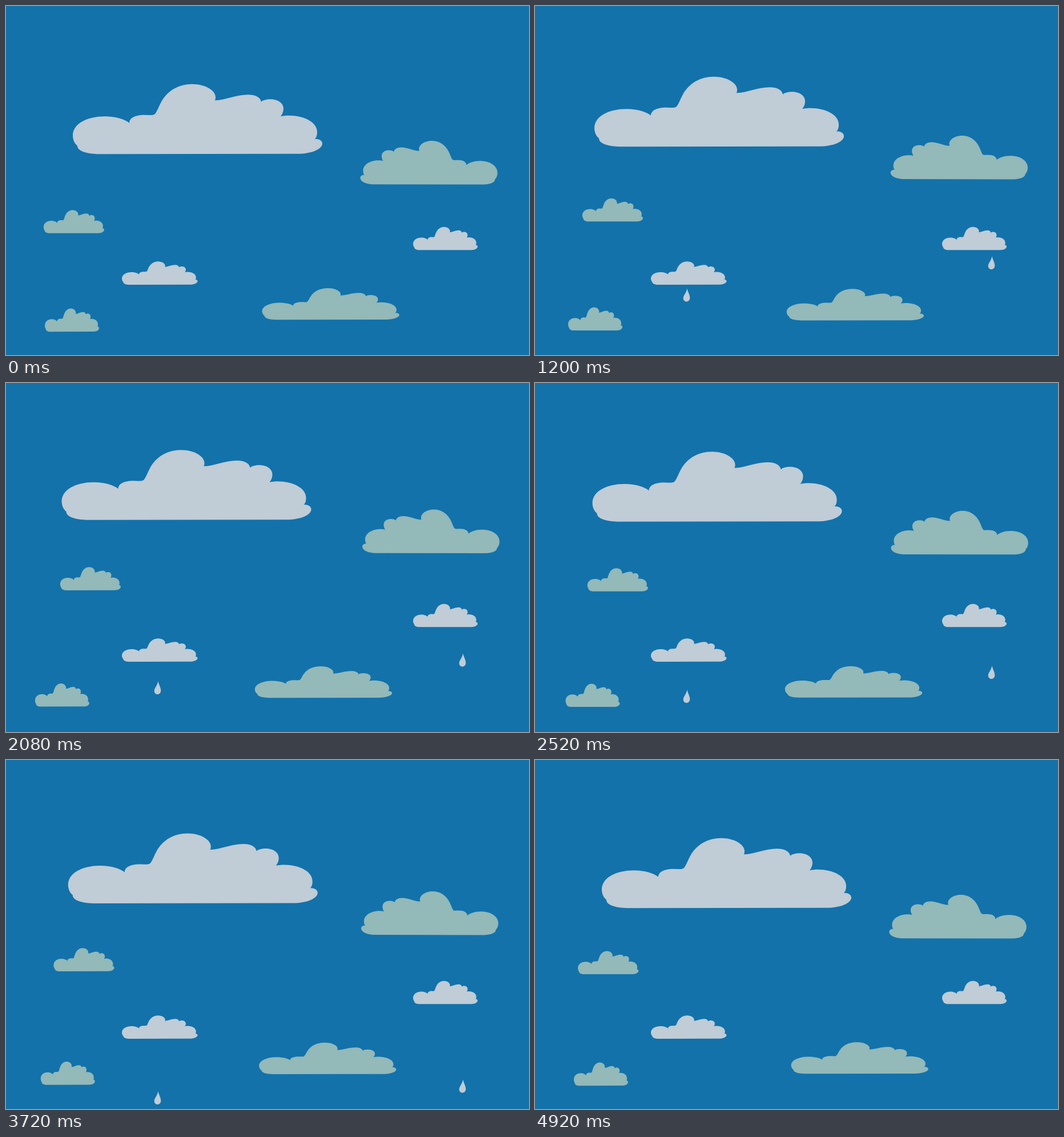
These frames come from a looping animation (916x611 px, 4.96 s). An HTML page with a canvas:

```html
<!DOCTYPE html>
<html lang="en">
<head>
<meta charset="utf-8">
<title>Clouds</title>
<style>
html, body { margin: 0; width: 100%; height: 100%; overflow: hidden; background: #1372aa; }
canvas { display: block; }
</style>
</head>
<body>
<canvas id="stage" width="916" height="611"></canvas>
<script>
const ctx = document.getElementById('stage').getContext('2d');
const LOOP = 4960, STEP = 40, END = 4920;
const SKY = '#1372aa', PALE = '#c0ccd6', GREEN = '#93b9b9';
const CLOUD_W = 437, CLOUD_H = 122.5;

const cloudShape = new Path2D(
  'M44 122.5C24 122 8 117 8 108C3 104 0 97 0 90C0 70 24 56.5 56 56.5' +
  'C76 56.5 92 62 99 68C99 59 110 54 125 54C133 54 140 55 143 53' +
  'C147 50 150 40 155 31C166 11 186 0 209 0C232 0 250 11 250 23' +
  'C250 25 249.5 27 249 28.5C268 28 286 18.5 307 18.5C319 18.5 329 23 330 31' +
  'C333 28 339 26.5 346 26.5C359 26.5 369 33 369 43C369 48 367 53 364 56.5' +
  'C369 55.5 373 55 378 55C406 55 428 67 428 84C428 89 427 93 424 96' +
  'C431 95 437 99 437 104C437 114 418 122 394 122Z');

const dropShape = new Path2D(
  'M0 0C1 6 4.8 11 4.8 16.5C4.8 20.5 2 23 -1.2 23' +
  'C-4.5 23 -6.8 20.5 -6.8 17C-6.8 12 -2 9 0 0Z');

// Each drifting cloud heads for `far` until `turn`, then on to `last`.
const clouds = [
  { x: 117, y: 136.8, w: 437, h: 122.5, color: PALE, turn: 1910, far: [-20.6, -20.8] },
  { x: 620.5, y: 236, w: 240.3, h: 76.5, color: GREEN, flip: true, turn: 1980, far: [3.7, -15] },
  { x: 65.8, y: 357.2, w: 106.2, h: 40.6, color: GREEN, turn: 2050, far: [29.2, -35], last: [9.3, -22.7] },
  { x: 713, y: 386.7, w: 113, h: 40.6, color: PALE },
  { x: 203, y: 447.2, w: 132.5, h: 40.8, color: PALE },
  { x: 448.6, y: 494, w: 240.3, h: 55.2, color: GREEN, turn: 2000, far: [-13.1, 2] },
  { x: 68, y: 529.6, w: 95, h: 40.6, color: GREEN, turn: 2070, far: [-17.2, -3.7] }
];

const dropTimes = [0, 760, 1680, 2520, 3000, 3720, 4960];
const drops = [
  { x: 266.5, tips: [461.5, 482, 509, 537, 554, 580, 625] },
  { x: 800.5, tips: [403, 424, 455.5, 495, 520, 559.5, 626] }
];

function drift({ turn, far, last = [0, 0] }, t) {
  if (!far) return [0, 0];
  if (t < turn) return far.map(d => d * t / turn);
  const p = Math.min(1, (t - turn) / (END - turn));
  return far.map((d, i) => d + (last[i] - d) * p);
}

// Smooth curve through unevenly spaced keys.
function curve(times, values, t) {
  const n = times.length - 1;
  let i = 0;
  while (i < n - 1 && t >= times[i + 1]) i++;
  const slope = k => {
    const a = Math.max(0, k - 1), b = Math.min(n, k + 1);
    return (values[b] - values[a]) / (times[b] - times[a]);
  };
  const span = times[i + 1] - times[i];
  const p = (t - times[i]) / span, q = 1 - p;
  return values[i] * q * q * (1 + 2 * p) + values[i + 1] * p * p * (3 - 2 * p) +
    span * p * q * (slope(i) * q - slope(i + 1) * p);
}

function fillAt(shape, color, x, y, sx = 1, sy = 1) {
  ctx.setTransform(sx, 0, 0, sy, x, y);
  ctx.fillStyle = color;
  ctx.fill(shape);
}

function draw(t) {
  ctx.setTransform(1, 0, 0, 1, 0, 0);
  ctx.fillStyle = SKY;
  ctx.fillRect(0, 0, 916, 611);
  for (const d of drops) fillAt(dropShape, PALE, d.x, curve(dropTimes, d.tips, t));
  for (const c of clouds) {
    const [dx, dy] = drift(c, t);
    const sx = c.w / CLOUD_W;
    fillAt(cloudShape, c.color, c.x + dx + (c.flip ? c.w : 0), c.y + dy,
      c.flip ? -sx : sx, c.h / CLOUD_H);
  }
}

const start = performance.now();
function tick() {
  const t = (performance.now() - start) % LOOP;
  draw(Math.floor(t / STEP) * STEP);
  requestAnimationFrame(tick);
}
tick();
</script>
</body>
</html>
```
